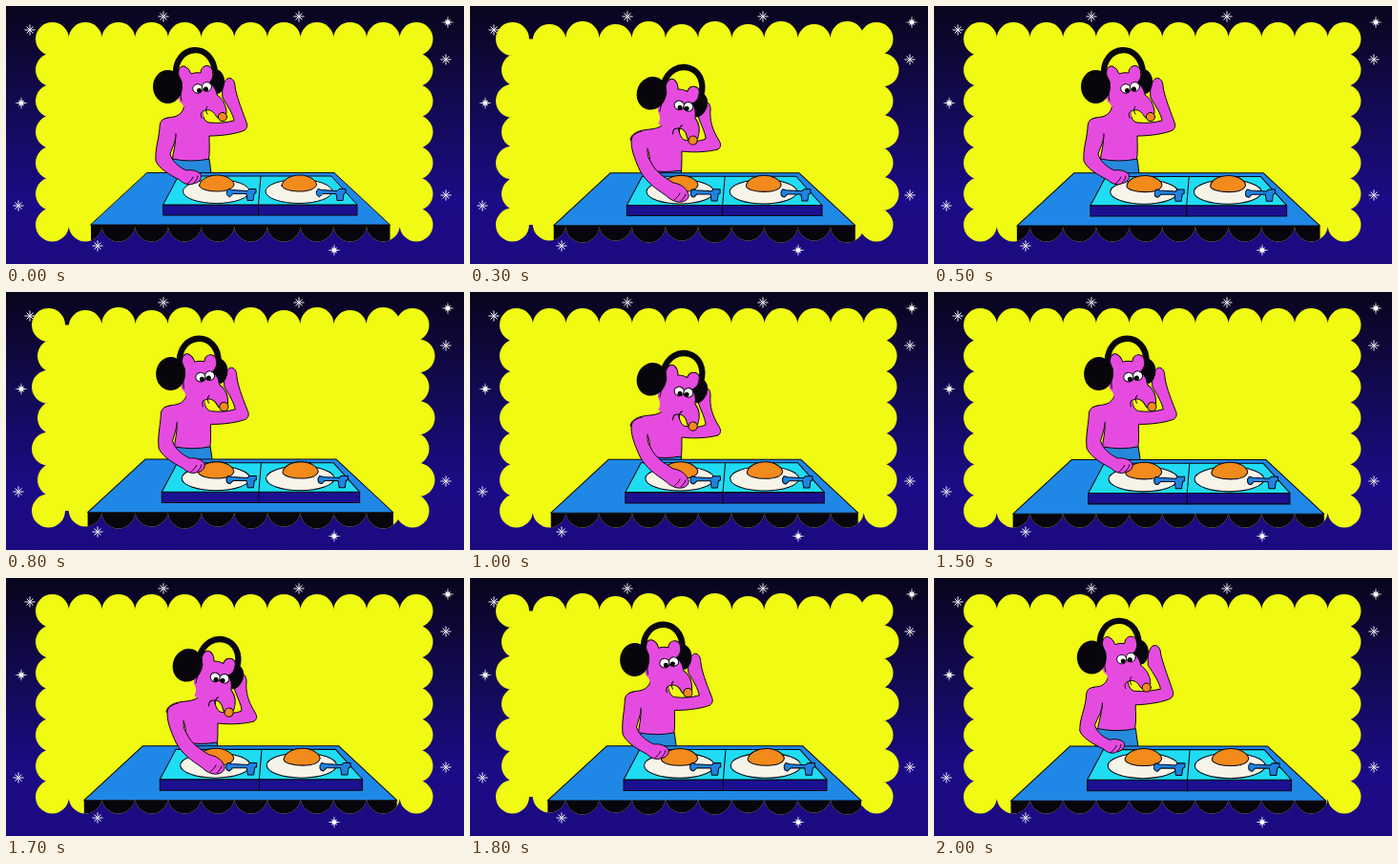
Animation of 480 by 270 pixels, one loop 2.1 s. Source, as an HTML page:

```html
<!DOCTYPE html>
<html lang="en">
<head>
<meta charset="utf-8">
<title>Breakfast DJ</title>
<style>
html, body { margin: 0; width: 100%; height: 100%; overflow: hidden; background: #0b0828; }
svg { display: block; width: 100vw; height: 100vh; }
.ink { stroke: #0a0610; stroke-width: 1; stroke-linejoin: round; stroke-linecap: round; }
.pink { fill: #e64bdf; }
.line { fill: none; }
</style>
</head>
<body>
<svg viewBox="0 0 480 270">
  <defs>
    <linearGradient id="night" x2="0" y2="1">
      <stop offset="0" stop-color="#09051c"/>
      <stop offset=".4" stop-color="#130a55"/>
      <stop offset=".75" stop-color="#1c0b86"/>
      <stop offset="1" stop-color="#1b0a80"/>
    </linearGradient>
    <clipPath id="frame"><path id="scallops"/></clipPath>
    <g id="egg" class="ink">
      <ellipse rx="35" ry="12.5" fill="#f6f3e8"/>
      <path d="M-18 -6C-17 -13-8 -17 1 -17C10 -17 18 -12 18.500 -7C17 -2 9 0 1 0C-8 0-17 -2-18 -6Z" fill="#f28a1c"/>
    </g>
    <path id="needle" class="ink" fill="#1f83e2" d="M1 -3C-2 0 -1 5 3 5L6 2L20 2L21 9L27 9L28 2L30 1L30 -3L23 -3L21 -1L5 -2Z"/>
  </defs>
  <rect width="480" height="270" fill="url(#night)"/>
  <path id="sparks" class="line" stroke="#f4f2f8" stroke-width="1" stroke-linecap="round"/>
  <path id="stars" fill="#fff"/>
  <g clip-path="url(#frame)">
    <rect width="480" height="270" fill="#f0fa12"/>
    <path id="torso" class="ink pink"/>
    <path id="trousers" class="ink" fill="#2589dc"/>
    <g id="head">
      <path class="line" d="M178 72C176 40 217 36 219 70" stroke="#08060c" stroke-width="6.300"/>
      <path class="pink" d="M178 88L203 88L207 116L187 112Q188 104 182 100Z"/>
      <path class="ink pink" d="M184 99C182 90 184 84 184 79C178 70 181 62 187 63Q192 65 194 71Q199 69 204 70C204 62 213 60 216 66C218 73 216 78 213 80C219 83 220 88 221 93C227 97 231 104 231 112C229 118 222 119 220 115C218 111 214 108 210 109C205 110 203 112 205 117"/>
      <path class="ink line" d="M211 105Q208 109 211 113"/>
      <g class="ink" fill="#fff">
        <ellipse cx="201" cy="86.500" rx="5.200" ry="4.800"/>
        <ellipse cx="210.500" cy="84.500" rx="5" ry="4.800"/>
      </g>
      <circle cx="202.500" cy="88.500" r="2.500"/>
      <circle cx="209.500" cy="87" r="2.500"/>
      <circle class="ink" cx="227" cy="116" r="4.600" fill="#f28a1c"/>
      <g fill="#08060c">
        <ellipse cx="169.500" cy="84.500" rx="15.500" ry="17.500"/>
        <path d="M217 66C225 65 230 73 229 81C228 88 225 92 221 92C219 87 217 83 213 80C217 76 218 71 217 66Z"/>
      </g>
    </g>
    <g id="table">
      <path d="M89 229H402.500V280H89Z" fill="#08060c"/>
      <path class="ink" d="M148 174.500H344L402.500 229H89Z" fill="#1f88e6"/>
      <path class="ink" d="M165 208H368V219H165Z" fill="#1b1090"/>
      <path class="ink" d="M181 178H341L368 208H165Z" fill="#1fdcf2"/>
      <path class="ink line" d="M267 178L264.500 208V219"/>
      <use href="#egg" x="220.500" y="194"/>
      <use href="#egg" x="307" y="194"/>
      <use href="#needle" x="232" y="194.500"/>
      <use href="#needle" x="326" y="194.500"/>
    </g>
    <path id="arm" class="ink pink"/>
    <path id="fingers" class="ink line"/>
  </g>
</svg>
<script>
const $ = id => document.getElementById(id);
const FRAME = 100, COUNT = 21;

// Each limb has a relaxed and a leaning outline with matching commands.
const limbs = {
  torso: [
    "M187 96C188 108 184 114 176 116C166 117 162 119 162 126L178 134C178 145 175 153 174 163L212 163C214 153 213 145 213 136C228 136 244 133 250 130C254 127 253 124 251 119C246 106 241 92 240 84C240 78 236 74 232 76C227 80 226 88 227 96C232 104 238 113 239 120C231 122 222 123 213 122C207 121 205 114 205 100",
    "M207 114C207 122 201 128 189 129C175 130 169 134 168 140L185 149C190 155 188 164 188 178L221 178C222 170 222 160 222 152C238 154 252 152 260 150C264 147 263 144 260 139C254 129 251 120 252 108C252 102 248 99 246 101C240 104 238 112 240 118C243 126 247 134 247 139C240 142 232 142 224 140C220 137 218 130 218 122"
  ],
  trousers: [
    "M174 160Q194 164 213 160L216 182L172 182Z",
    "M188 172Q204 175 221 172L223 182L187 182Z"
  ],
  arm: [
    "M170 117C163 118 161 121 161 128C160 140 156 150 157 162C160 170 172 177 182 182C186 186 192 188 196 186C202 185 206 181 204 176C200 172 194 171 189 172C180 168 174 162 172 155C174 148 178 142 178 134",
    "M180 131C172 133 169 136 169 142C169 152 174 163 178 172C184 184 196 192 205 198C209 202 215 206 222 205C228 204 231 199 228 195C226 190 220 186 213 185C205 180 194 174 189 162C186 158 186 154 186 149"
  ],
  fingers: [
    "M190 186C192 184 195 182 196 179M197 185C199 183 201 181 201 178",
    "M214 203C216 201 219 199 220 196M221 204C223 202 225 200 226 197"
  ]
};

function mix([from, to], p) {
  const ends = to.match(/\d+/g);
  let i = 0;
  return from.replace(/\d+/g, n => (+n + (ends[i++] - n) * p).toFixed(2) + " ");
}

const circle = (x, y, r) => `M${x - r} ${y}a${r} ${r} 0 1 1 ${2 * r} 0a${r} ${r} 0 1 1 ${-2 * r} 0Z`;

// The loose border pushes every other bump sideways.
function scallops(loose) {
  const R = 17.5, left = 48.5, right = 430, top = 34.5, bottom = 229;
  const columns = 11, rows = 6;
  let d = `M${left} ${top}H${right}V${bottom}H${left}Z`;
  for (let i = 1; i < columns; i++) {
    const x = left + (right - left) * i / columns, odd = i % 2;
    d += circle(x, top + loose * (odd ? 2 : -1), R);
    d += circle(x, bottom + loose * (odd ? -1 : 1), R);
  }
  for (let i = 0; i <= rows; i++) {
    const y = top + (bottom - top) * i / rows;
    const shift = loose * (i % 2 ? 2 : -4);
    d += circle(left + shift, y, R) + circle(right + shift, y, R);
  }
  return d;
}
const borders = [scallops(0), scallops(1)];

const spark = ([x, y]) => [0, 1, 2, 3].map(k => {
  const a = k * Math.PI / 4, r = k % 2 ? 4.5 : 5.2;
  const u = r * Math.cos(a), v = r * Math.sin(a);
  return `M${x - u} ${y - v}L${x + u} ${y + v}`;
}).join("");
const star = ([x, y]) => {
  let d = "";
  for (let k = 0; k < 16; k++) {
    const a = k * Math.PI / 8, r = k % 2 ? 2 : k % 4 ? 4.5 : 7;
    d += `${k ? "L" : "M"}${x + r * Math.cos(a)} ${y + r * Math.sin(a)}`;
  }
  return d + "Z";
};
$("sparks").setAttribute("d", [[25, 25], [165, 11], [307, 11], [461, 56], [13, 209], [461, 198], [96, 251]].map(spark).join(""));
$("stars").setAttribute("d", [[463, 17], [16, 101.5], [344, 255.5]].map(star).join(""));

// Lean amount over one beat; the beat repeats three times per loop.
const beat = [0, 0.15, 1, 1, 0.15, 0, -0.2];

function draw(ms) {
  const step = Math.floor(ms / FRAME) % COUNT;
  const lean = beat[step % beat.length];
  for (const id in limbs) $(id).setAttribute("d", mix(limbs[id], lean));
  const turn = 20 * Math.max(0, lean);
  $("head").setAttribute("transform", `translate(${21 * lean} ${7 * lean}) rotate(${turn} 170 84)`);
  const zoom = 1 + 0.054 * step / (COUNT - 1);
  $("table").setAttribute("transform", `translate(246 148) scale(${zoom}) translate(-246 -148)`);
  $("scallops").setAttribute("d", borders[Math.floor(step * FRAME / 250) % 2]);
}

const start = performance.now();
function tick() {
  draw(performance.now() - start);
  requestAnimationFrame(tick);
}
tick();
</script>
</body>
</html>
```
